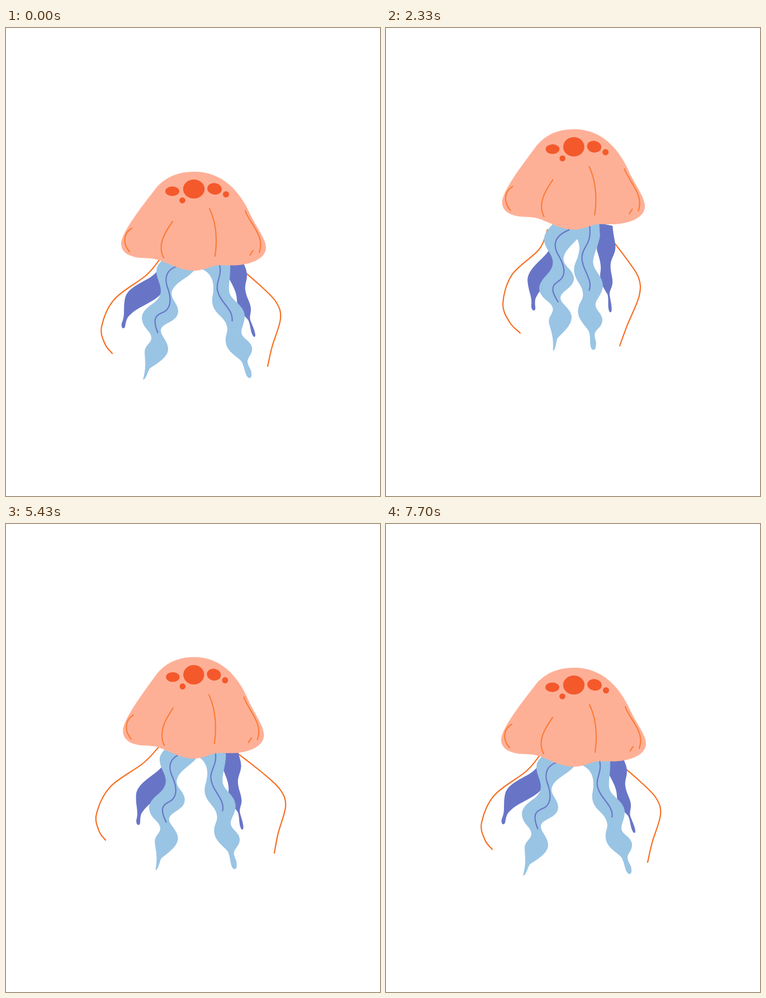
Write an HTML page that moves like this. It is 669 px wide and 837 px high and loops after 8010 ms.

```html
<!DOCTYPE html>
<html lang="en">
<head>
<meta charset="utf-8">
<title>Jellyfish</title>
<style>
  html, body { margin: 0; height: 100%; overflow: hidden; background: #fff; }
  svg { display: block; width: 100%; height: 100%; }
  .line { fill: none; stroke-linecap: round; stroke-width: 2.2; }
</style>
</head>
<body>
<svg viewBox="0 0 669 837">
  <g class="line" stroke="#f76f23">
    <path id="threadL"/>
    <path id="threadR"/>
  </g>
  <g fill="#6875c7">
    <path id="backL" d="M282 405C281 422 272 437 258 446C242 456 217 465 213 483C209 502 214 512 207 528C205 537 211 540 213 534C215 525 215 519 222 513C236 498 262 492 277 476C290 462 288 420 290 405Z"/>
    <path id="backR" d="M390 400L418 400C424 422 431 430 431 442C431 452 427 458 428 468C430 484 439 492 438 506C437 514 435 518 438 525C441 533 446 543 446 550C445 555 442 552 440 547C437 540 437 529 433 522C424 512 414 502 413 487C413 472 405 460 399 448Z"/>
  </g>
  <g id="frontL">
    <path fill="#99c4e4" d="M305 395C292 408 276 414 270 428C266 445 277 455 277 470C276 494 246 495 243 517C243 537 260 541 260 555C259 565 248 567 248 580C249 599 251 606 245 629C250 629 253 616 257 609C268 601 290 590 290 574C290 560 276 550 277 540C279 526 308 527 308 506C307 492 297 488 296 475C298 456 325 448 336 434L350 395Z"/>
    <path class="line" stroke="#6876c8" d="M317 423C285 429 282 447 290 467C295 483 296 499 284 507C276 511 267 513 266.5 524C266.5 532 269 539 271.5 545"/>
  </g>
  <g id="frontR">
    <path fill="#99c4e4" d="M345 400L352 432C365 438 371 450 371 464C371 478 368 482 369 491C372 514 395 516 396 539C395 549 392 551 393 561C394 579 415 588 421 596C427 605 427 620 433 625C437 628 440 624 439 618C439 609 432 605 432 596C433 587 441 584 440 572C438 558 421 556 421 543C422 533 427 528 427 514C425 493 401 488 399 470C398 456 402 442 401 425L392 395Z"/>
    <path class="line" stroke="#6876c8" d="M378 410C391 442 375 450 378 468C382 491 407 502 404.5 524"/>
  </g>
  <g id="bell">
    <path fill="#feb097" d="M337 257C384 257 415 288 434 327C445 353 465 376 465 393C465 411 441 423 410 424.5C396 425 383 423 371 426C358 430 349 434 336 434C312 434 290 420 270 414C254 410 243 413 228 409C214 405 206 398 206 386C206 368 236 328 264 292C281 268 306 257 337 257Z"/>
    <g fill="#f4592b">
      <ellipse cx="336" cy="288" rx="19.2" ry="17"/>
      <ellipse cx="297.5" cy="292" rx="12.5" ry="8.5"/>
      <ellipse cx="373" cy="287.7" rx="13" ry="10.3" transform="rotate(10 373 287.7)"/>
      <circle cx="393.5" cy="297.5" r="5.5"/>
      <circle cx="315.5" cy="308.3" r="5.4"/>
    </g>
    <path class="line" stroke="#fb7c36" d="M225 358C211 366 207 384 221 400M298 346C284 366 270 388 282 411M364 323C377 350 378 380 374 408M428 327C436 350 464 372 453 401M442 398L436.5 406"/>
  </g>
</svg>
<script>
const $ = id => document.getElementById(id);

// Tentacles: pivot, full swing in degrees, and how late the swing builds up
const ARMS = {
  backL: { x: 318, y: 352, turn: -16, lag: 1 },
  backR: { x: 370, y: 340, turn: 11.3, lag: 1 },
  frontL: { x: 285, y: 366, turn: -11.6, lag: 1.3 },
  frontR: { x: 385, y: 348, turn: 13.3, lag: 1.3 }
};

// Threads at rest, from the root under the bell to the tip
const THREADS = {
  threadL: { inward: 1, rest: [[277, 411], [251, 442], [194, 485], [171, 534], [177, 565], [190, 582]] },
  threadR: { inward: -1, rest: [[412, 424], [453, 459], [483, 490], [491, 520], [476, 570], [468, 605]] }
};

const ramp = (t, from, to) => Math.min(1, Math.max(0, (t - from) / (to - from)));
const ease = (t, from, to) => (1 - Math.cos(Math.PI * ramp(t, from, to))) / 2;

// Catmull-Rom spline as SVG path data
function spline(p) {
  const at = i => p[Math.min(p.length - 1, Math.max(0, i))];
  let d = 'M' + p[0];
  for (let i = 0; i < p.length - 1; i++) {
    const c = [0, 1].map(k => at(i)[k] + (at(i + 1)[k] - at(i - 1)[k]) / 6);
    const e = [0, 1].map(k => at(i + 1)[k] - (at(i + 2)[k] - at(i)[k]) / 6);
    d += `C${c} ${e} ${p[i + 1]}`;
  }
  return d;
}

// One stroke: drift up, kick with a squeeze, then sink back to rest
function draw(t) {
  const rise = 23 * ramp(t, 500, 2000) + 62 * ramp(t, 1260, 2000) ** 2.2;
  const lift = -rise * (1 - ease(t, 2000, 3470));
  const squeeze = .2 * (ease(t, 1260, 2000) - ease(t, 2000, 2400));
  $('bell').setAttribute('transform',
    `translate(329.5 ${345.5 + lift}) scale(${1 - squeeze} ${1 + squeeze}) translate(-329.5 -345.5)`);

  const trail = lift * .73, relax = 1 - ease(t, 2330, 3600);
  for (const id in ARMS) {
    const { x, y, turn, lag } = ARMS[id];
    const angle = turn * ramp(t, 500, 2330) ** lag * relax;
    $(id).setAttribute('transform', `translate(0 ${trail}) rotate(${angle} ${x} ${y})`);
  }

  // Threads flare outward first, then are dragged in, most at the tip
  const flare = 12 * Math.sin(Math.PI * ramp(t, 500, 2330)) ** 2;
  const pull = 50 * ease(t, 1550, 2330) * relax - flare;
  for (const id in THREADS) {
    const { inward, rest } = THREADS[id];
    $(id).setAttribute('d', spline(rest.map(([x, y], i) => {
      const bend = pull * ((i + .5) / 5.5) ** .6;
      return [x + inward * bend, y + trail + .36 * bend];
    })));
  }
}

// Two strokes per loop; pictures step at 0 and 30 ms of every 100
function tick() {
  const t = performance.now() % 8010;
  const u = t < 8000 ? t % 4000 : 0;
  draw(Math.floor(u / 100) * 100 + (u % 100 < 30 ? 0 : 33));
  requestAnimationFrame(tick);
}
tick();
</script>
</body>
</html>
```
